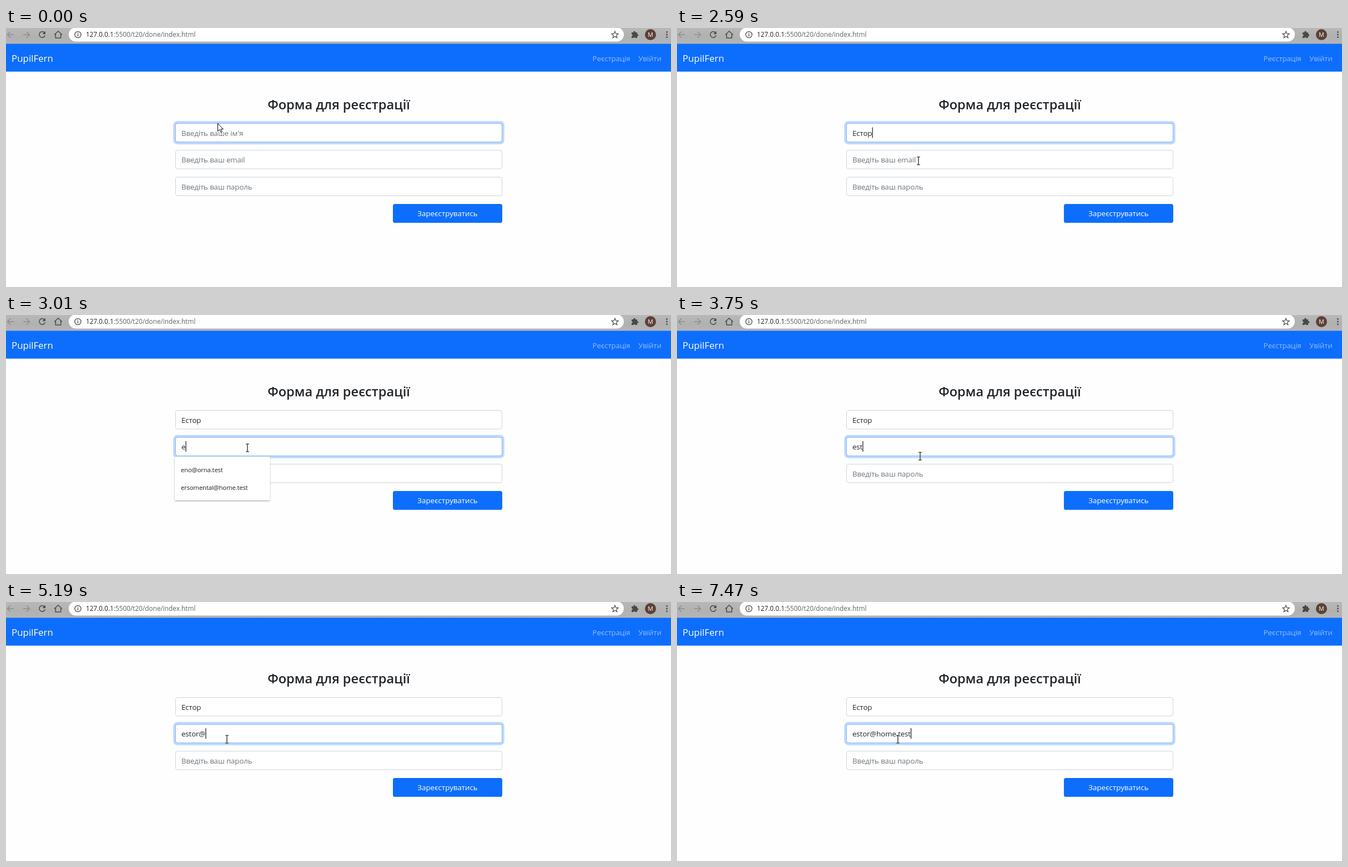
These frames come from a looping animation (1198x468 px, 8000 ms). An HTML page:

```html
<!DOCTYPE html>
<html lang="uk">
<head>
<meta charset="utf-8">
<title>Форма для реєстрації</title>
<style>
  html, body { margin: 0; width: 100%; height: 100%; overflow: hidden; background: #fefefe; }
  svg { display: block; width: 1198px; height: 468px; }
  text { font-family: "Open Sans", "Noto Sans", sans-serif; font-size: 13.3px; letter-spacing: -.12px; white-space: pre; }
  .hint { fill: #6c757d; }
  .value { fill: #212529; }
  .nav { fill: #fff; fill-opacity: .55; text-anchor: middle; }
  .url { font-size: 11.8px; letter-spacing: 0; fill: #5f6368; }
  .item { font-size: 11.3px; font-weight: 500; letter-spacing: -.15px; fill: #202124; }
  .icon { fill: none; stroke: #494949; stroke-width: 1.5; }
  .dim { stroke: #8e8e8e; }
</style>
</head>
<body>
<svg viewBox="0 0 1198 468">
  <defs>
    <linearGradient id="metal" x1="0" y1="0" x2="0" y2="1">
      <stop offset="0" stop-color="#b8b8b8"/>
      <stop offset=".55" stop-color="#b1b1b1"/>
      <stop offset="1" stop-color="#b5b5b5"/>
    </linearGradient>
    <filter id="shade" x="-10%" y="-10%" width="120%" height="120%">
      <feDropShadow dx="0" dy="1" stdDeviation="1.3" flood-color="#000" flood-opacity=".4"/>
    </filter>
  </defs>
  <rect width="1198" height="468" fill="#fefefe"/>

  <!-- browser bar -->
  <rect width="1198" height="29" fill="url(#metal)"/>
  <rect x="113" y="-1" width="1000" height="25.5" rx="12.7" fill="#fff"/>
  <path class="icon dim" d="M14 12H3M8 6.500L2.500 12L8 17.500M31 12H42M37 6.500L42.500 12L37 17.500"/>
  <path class="icon" d="M69.300 8.500A5.300 5.300 0 1 0 70.300 13.300"/>
  <path d="M71 5.500V11H65.500Z" fill="#494949"/>
  <path class="icon" d="M87 12.300L94 5.800L101 12.300M89.300 11V18H98.700V11"/>
  <circle class="icon" cx="129.500" cy="12" r="5.600" style="stroke-width:1.300"/>
  <path class="icon" d="M129.500 11V15M129.500 8.400V9.900" style="stroke-width:1.400"/>
  <text class="url" x="144" y="16"><tspan fill="#202124">127.0.0.1</tspan>:5500/t20/done/index.html</text>
  <path class="icon" style="stroke-width:1.200" d="M1097 6L1098.700 10.200L1103 10.500L1099.700 13.300L1100.800 17.600L1097 15.200L1093.200 17.600L1094.300 13.300L1091 10.500L1095.300 10.200Z"/>
  <path fill="#494949" d="M1127 8H1130.300A1.800 1.800 0 1 1 1133.700 8H1137V11.200A1.800 1.800 0 1 1 1137 14.600V18H1133.600A1.700 1.700 0 0 0 1130.400 18H1127V14.700A1.700 1.700 0 0 0 1127 11.300Z"/>
  <circle cx="1161" cy="12" r="10" fill="#5d4037"/>
  <text x="1161" y="16" text-anchor="middle" fill="#fff" style="font-size:10.500px">M</text>
  <g fill="#494949"><circle cx="1190.500" cy="7.300" r="1.400"/><circle cx="1190.500" cy="12" r="1.400"/><circle cx="1190.500" cy="16.700" r="1.400"/></g>

  <!-- page -->
  <rect y="28.500" width="1198" height="50.300" fill="#0d6efd"/>
  <text x="10" y="61" fill="#fff" style="font-size:16.900px;letter-spacing:0">PupilFern</text>
  <text class="nav" x="1090.500" y="59.500">Реєстрація</text>
  <text class="nav" x="1160" y="59.500">Увійти</text>
  <text x="599.500" y="147" text-anchor="middle" class="value" style="font-size:23.600px;font-weight:600;letter-spacing:0">Форма для реєстрації</text>
  <g id="fields"></g>
  <rect x="697" y="318" width="197" height="34" rx="3.600" fill="#0d6efd"/>
  <text x="795.500" y="340" text-anchor="middle" fill="#fff" style="letter-spacing:0">Зареєструватись</text>

  <g id="menu">
    <rect id="panel" x="304" y="256" width="171.500" rx="2.500" fill="#fff" filter="url(#shade)"/>
    <g id="items"></g>
  </g>
  <path id="arrow" d="M.5 .5V14.700L3.800 11.600L6.200 16.700L8.300 15.700L6 10.800H10.400Z" fill="#fff" stroke="#000"/>
  <g id="beam" fill="none">
    <path d="M-3 -7H-.800L0 -6.300L.800 -7H3M0 -6.500V6.500M-3 7H-.800L0 6.300L.800 7H3" stroke="#fff" stroke-width="2.400" opacity=".6"/>
    <path d="M-3 -7H-.800L0 -6.300L.800 -7H3M0 -6.500V6.500M-3 7H-.800L0 6.300L.800 7H3" stroke="#111" stroke-width="1.200"/>
  </g>
</svg>
<script>
const LOOP = 8000;
const NAME = 'Естор';
const EMAIL = 'estor@home.test';
const ALL_HINTS = ['900004820000730', 'verbomozk@home.test', 'ku@ku', 'hod@hodd', 'q', 'w'];
const MATCHES = ['eno@orna.test', 'ersomental@home.test'];

// Each step is [start time, value...] and holds until the next one.
const nameSteps = [[0, 0], [560, 1], [840, 2], [980, 3], [1120, 4], [1580, 5]];
const emailSteps = [[0, 0], [3010, 1], [3160, 2], [3750, 3], [4190, 4], [4480, 5], [5190, 6], [5470, 7],
  [5750, 8], [5900, 9], [6050, 10], [6480, 11], [6760, 12], [7190, 14], [7470, 15]];
const mouseSteps = [[0, 381, 172], [2040, 384, 177], [2180, 398, 196], [2320, 415, 214], [2450, 428, 230],
  [2590, 435, 240], [3310, 436, 246], [3470, 438, 255], [3900, 442, 265], [4050, 447, 280],
  [4190, 448, 285], [4330, 440, 276], [4480, 422, 262], [4620, 405, 252], [4760, 398, 248]];
const emailFocusSteps = [[0, 0], [2730, .45], [2860, 1]];
const menuSteps = [[0, []], [2730, ALL_HINTS], [3010, MATCHES], [3160, []]];

const $ = id => document.getElementById(id);
const at = (steps, t) => steps.findLast(step => step[0] <= t).slice(1);

function add(parent, tag, attrs) {
  const node = document.createElementNS('http://www.w3.org/2000/svg', tag);
  for (const key in attrs) node.setAttribute(key, attrs[key]);
  return parent.appendChild(node);
}

function set(node, attrs) {
  for (const key in attrs) node.setAttribute(key, attrs[key]);
}

function show(node, on) {
  node.setAttribute('visibility', on ? 'visible' : 'hidden');
}

function makeField(y, hint) {
  const box = { x: 305.5, y: y + .5, width: 588, height: 33.5, rx: 3.4 };
  const root = $('fields');
  const ring = add(root, 'rect', { fill: '#0d6efd' });
  add(root, 'rect', { ...box, fill: '#fff', stroke: '#ced4da' });
  const edge = add(root, 'rect', { ...box, fill: 'none', stroke: '#86b7fe' });
  const text = add(root, 'text', { x: 316, y: y + 22.7 });
  const caret = add(root, 'rect', { y: y + 7.5, width: 1.1, height: 19, fill: '#000' });
  return (value, focus, caretOn) => {
    const spread = 3.7 * focus;
    set(ring, { x: 305 - spread, y: y - spread, width: 589 + 2 * spread, height: 34.5 + 2 * spread,
      rx: 3.6 + spread, 'fill-opacity': .27 * focus });
    edge.setAttribute('opacity', focus);
    text.textContent = value || hint;
    text.setAttribute('class', value ? 'value' : 'hint');
    caret.setAttribute('x', 316.2 + (value ? text.getComputedTextLength() : 0));
    show(caret, caretOn);
  };
}

const drawName = makeField(172, "Введіть ваше ім'я");
const drawEmail = makeField(220.5, 'Введіть ваш email');
const drawPassword = makeField(269, 'Введіть ваш пароль');

function drawMenu(list) {
  show($('menu'), list.length);
  $('panel').setAttribute('height', 14.5 + 32.3 * list.length);
  $('items').replaceChildren();
  list.forEach((label, i) => {
    add($('items'), 'text', { x: 315, y: 283.7 + 32.3 * i, class: 'item' }).textContent = label;
  });
}

function drawMouse(x, y) {
  const overField = [172, 220.5, 269].some(top => y > top && y <= top + 35);
  const useBeam = overField && y !== 172;
  show($('beam'), useBeam);
  show($('arrow'), !useBeam);
  $(useBeam ? 'beam' : 'arrow').setAttribute('transform', `translate(${x} ${y})`);
}

function draw(t) {
  const [emailFocus] = at(emailFocusSteps, t);
  drawName(NAME.slice(0, at(nameSteps, t)[0]), 1 - emailFocus, t >= 410 && t < 2730);
  drawEmail(EMAIL.slice(0, at(emailSteps, t)[0]), emailFocus, t >= 2730);
  drawPassword('', 0, false);
  drawMenu(at(menuSteps, t)[0]);
  drawMouse(...at(mouseSteps, t));
}

const start = performance.now();
function tick() {
  draw((performance.now() - start) % LOOP);
  requestAnimationFrame(tick);
}
tick();
</script>
</body>
</html>
```
